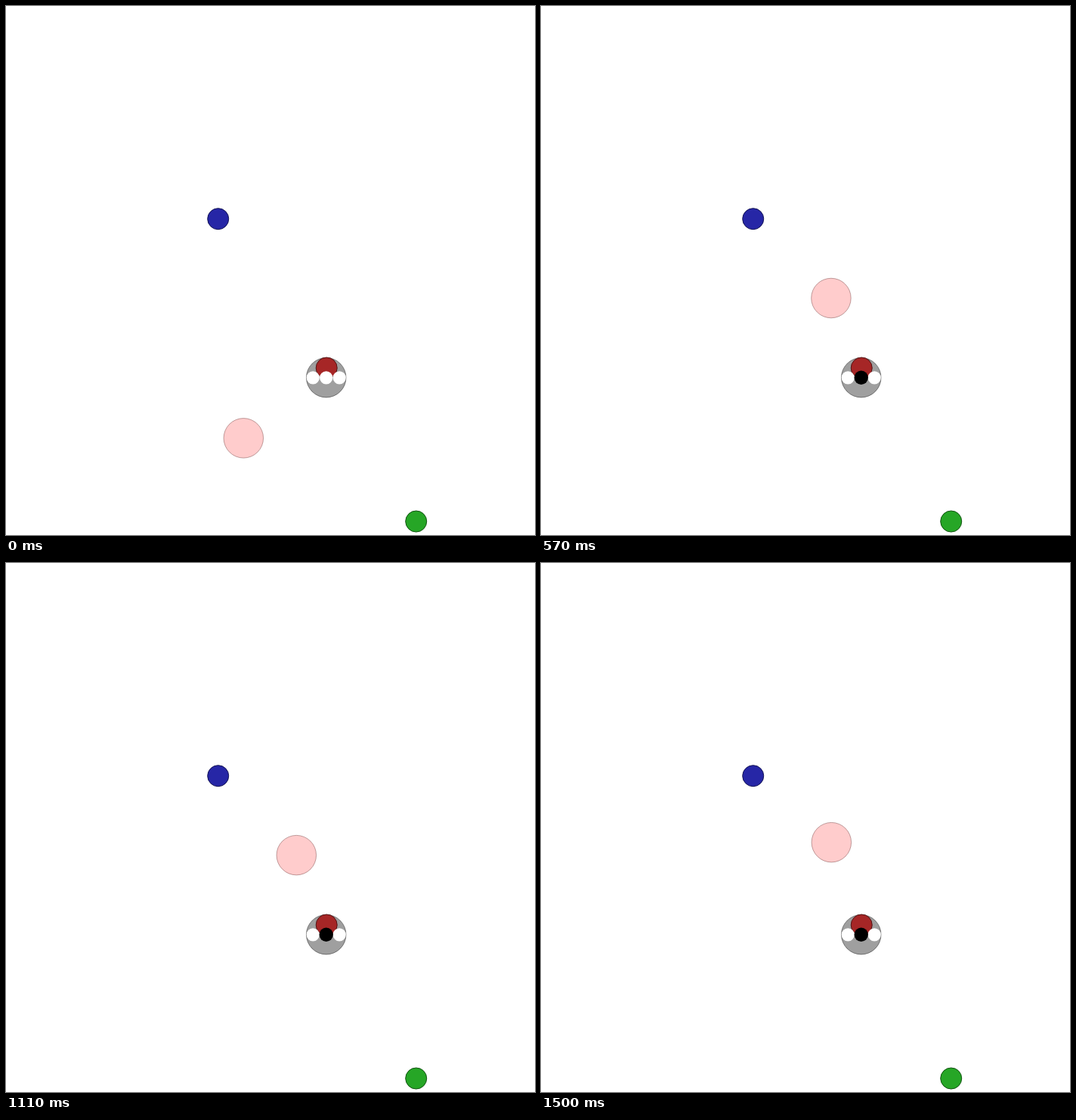
Write an HTML page that moves like this. It is 700 px wide and 700 px high and loops after 1.53 s.

```html
<!DOCTYPE html>
<html lang="en">
<head>
<meta charset="utf-8">
<title>Speaker and listener</title>
<style>
  html, body { margin: 0; width: 100%; height: 100%; overflow: hidden; background: #fff; }
  svg { display: block; width: 100%; height: 100%; }
</style>
</head>
<body>
<svg viewBox="0 0 700 700">
  <g stroke="#4c2626" stroke-opacity=".5">
    <circle cx="423.7" cy="491.7" r="26.25" fill="#9f9f9f" stroke="#202020"/>
    <circle id="listener" r="26.25" fill="#fcc" stroke="#804c4c"/>
  </g>
  <g stroke-width="1">
    <circle cx="424.2" cy="479" r="14" fill="#a62626" stroke="#531313"/>
    <circle cx="542.7" cy="682" r="14" fill="#26a626" stroke="#135313"/>
    <circle cx="280.7" cy="281.7" r="14" fill="#2626a6" stroke="#131353"/>
  </g>
  <g fill="#fff">
    <circle cx="406.2" cy="491.8" r="8.6"/>
    <circle cx="441.2" cy="491.8" r="8.6"/>
    <circle id="signal" cx="423.7" cy="491.8" r="8.6"/>
  </g>
</svg>
<script>
const STEP = 30, COUNT = 51, PUSH = 70, EASE = 0.25;
const HOME = { x: 314.3, y: 571.8 };
const listener = document.getElementById('listener');
const signal = document.getElementById('signal');

// Net pushes so far; each one moves the resting point by PUSH.
const right = n => n >= 2 ? 1 : 0;
function up(n) {
  if (n < 7) return Math.max(0, n - 2);
  return n > 9 && (n + 1) % 9 < 2 ? 2 : 3;
}

// Damped motion: every step covers a quarter of the way to the resting point.
function pose(step) {
  let { x, y } = HOME;
  for (let n = 1; n <= step; n++) {
    x += EASE * (HOME.x + PUSH * right(n) - x);
    y += EASE * (HOME.y - PUSH * up(n) - y);
  }
  return { x, y };
}

const start = performance.now();

function draw() {
  const elapsed = Math.max(0, performance.now() - start);
  const step = Math.floor(elapsed / STEP) % COUNT;
  const { x, y } = pose(step);
  listener.setAttribute('cx', x);
  listener.setAttribute('cy', y);
  signal.setAttribute('r', step ? 9.2 : 8.6);
  signal.setAttribute('fill', step ? '#000' : '#fff');
  requestAnimationFrame(draw);
}
draw();
</script>
</body>
</html>
```
